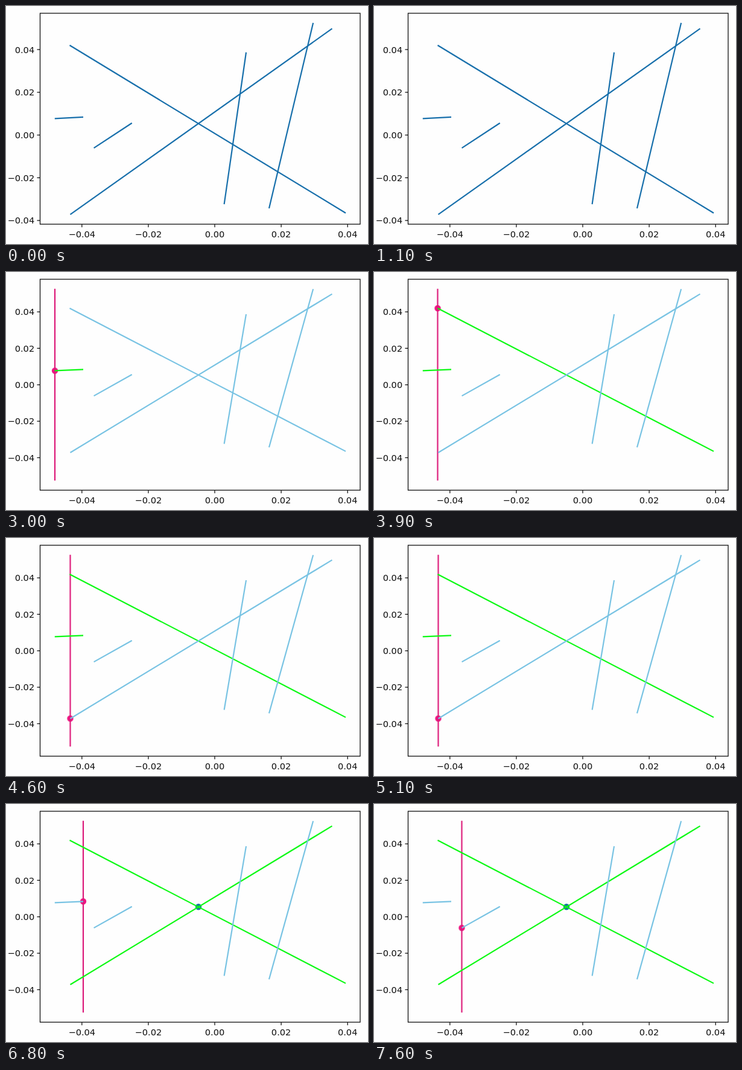
Animation of 600 by 394 pixels, one loop 8000 ms. Source, as an HTML page:

```html
<!DOCTYPE html>
<html lang="en">
<head>
<meta charset="utf-8">
<title>Sweep line</title>
<style>
html, body { margin: 0; width: 100%; height: 100%; overflow: hidden; background: #fefefe; }
svg { display: block; }
text { font: 14.6px "DejaVu Sans", sans-serif; fill: #111; }
line { stroke-width: 2.2; }
.axis { fill: none; stroke: #111; stroke-width: 1.3; }
.intro { stroke: #176fab; animation: intro 8s step-end infinite; }
.scan { stroke: #78c3e3; animation: scan 8s step-end infinite; }
.plain { stroke: none; }
#sweep { stroke: #dc1878; animation: sweep 8s step-end infinite; }
#event { fill: #ee1682; animation: event 8s step-end infinite; }
#cross { fill: #14789c; animation: cross 8s step-end infinite; }
.scan .a { animation: segA 8s step-end infinite; }
.scan .b { animation: segB 8s step-end infinite; }
.scan .c { animation: segC 8s step-end infinite; }

@keyframes intro { 0% { visibility: visible } 14.5%, 100% { visibility: hidden } }
@keyframes scan { 0% { opacity: 0 } 14.5%, 100% { opacity: 1 } }
@keyframes sweep {
  0% { transform: translateX(81px) }
  38.25% { transform: translateX(105.5px) }
  57% { transform: translateX(106.5px) }
  75.75% { transform: translateX(128px) }
  94.5%, 100% { transform: translateX(145.5px) }
}
@keyframes event {
  0% { transform: translate(81px, 163.4px) }
  38.25% { transform: translate(105.5px, 60px) }
  57% { transform: translate(106.5px, 298.8px) }
  75.75% { transform: translate(128px, 161.2px) }
  94.5%, 100% { transform: translate(145.5px, 205.1px) }
}
@keyframes cross { 0% { opacity: 0 } 84.5%, 100% { opacity: 1 } }
@keyframes segA { 0% { stroke: #78c3e3 } 28.25% { stroke: #0cf914 } 84.5%, 100% { stroke: #78c3e3 } }
@keyframes segB { 0% { stroke: #78c3e3 } 48.25%, 100% { stroke: #0cf914 } }
@keyframes segC { 0% { stroke: #78c3e3 } 65.75%, 100% { stroke: #0cf914 } }
</style>
</head>
<body>
<svg width="600" height="394" viewBox="0 0 600 394">
  <g id="frame"><rect class="axis" x="56.5" y="12" width="530.5" height="349.2"/></g>
  <g class="intro" id="intro"></g>
  <g class="scan" id="scan">
    <circle id="event" r="5.2" stroke="none"/>
    <circle id="cross" cx="319" cy="170.3" r="5.2" stroke="none"/>
    <line id="sweep" y1="27.8" y2="345.2"/>
  </g>
</svg>
<script>
const ticks = [-0.04, -0.02, 0, 0.02, 0.04];
// name, x1, value1, x2, value2
const segments = [
  ['a', 80.8, 0.0077, 128, 0.0084],
  ['b', 105.5, 0.042, 563, -0.0365],
  ['c', 106.5, -0.0372, 540.5, 0.0498],
  ['d', 145.6, -0.0061, 208.7, 0.0056],
  ['e', 361.6, -0.0324, 398, 0.0387],
  ['f', 436, -0.0343, 509.1, 0.0525]
];

function add(parent, tag, attrs, label = '') {
  const node = document.createElementNS('http://www.w3.org/2000/svg', tag);
  for (const key in attrs) node.setAttribute(key, attrs[key]);
  node.textContent = label;
  parent.append(node);
}

const format = v => v.toFixed(2).replace('-', '\u2212');

function drawPlot(group, zero, scale) {
  const y = v => zero - scale * v;
  for (const v of ticks) {
    add(group, 'path', { class: 'axis', d: `M56.5 ${y(v)}h-5` });
    add(group, 'text', { class: 'plain', x: 47.2, y: y(v) + 5.4, 'text-anchor': 'end' }, format(v));
  }
  for (const [name, x1, v1, x2, v2] of segments)
    add(group, 'line', { class: name, x1, y1: y(v1), x2, y2: y(v2) });
}

const frame = document.getElementById('frame');
for (const v of ticks) {
  const x = 346 + 5505 * v;
  add(frame, 'path', { class: 'axis', d: `M${x} 361.2v5` });
  add(frame, 'text', { x, y: 383.3, 'text-anchor': 'middle' }, format(v));
}
drawPlot(document.getElementById('intro'), 213.6, 3537);
drawPlot(document.getElementById('scan'), 186.7, 3018);
</script>
</body>
</html>
```
